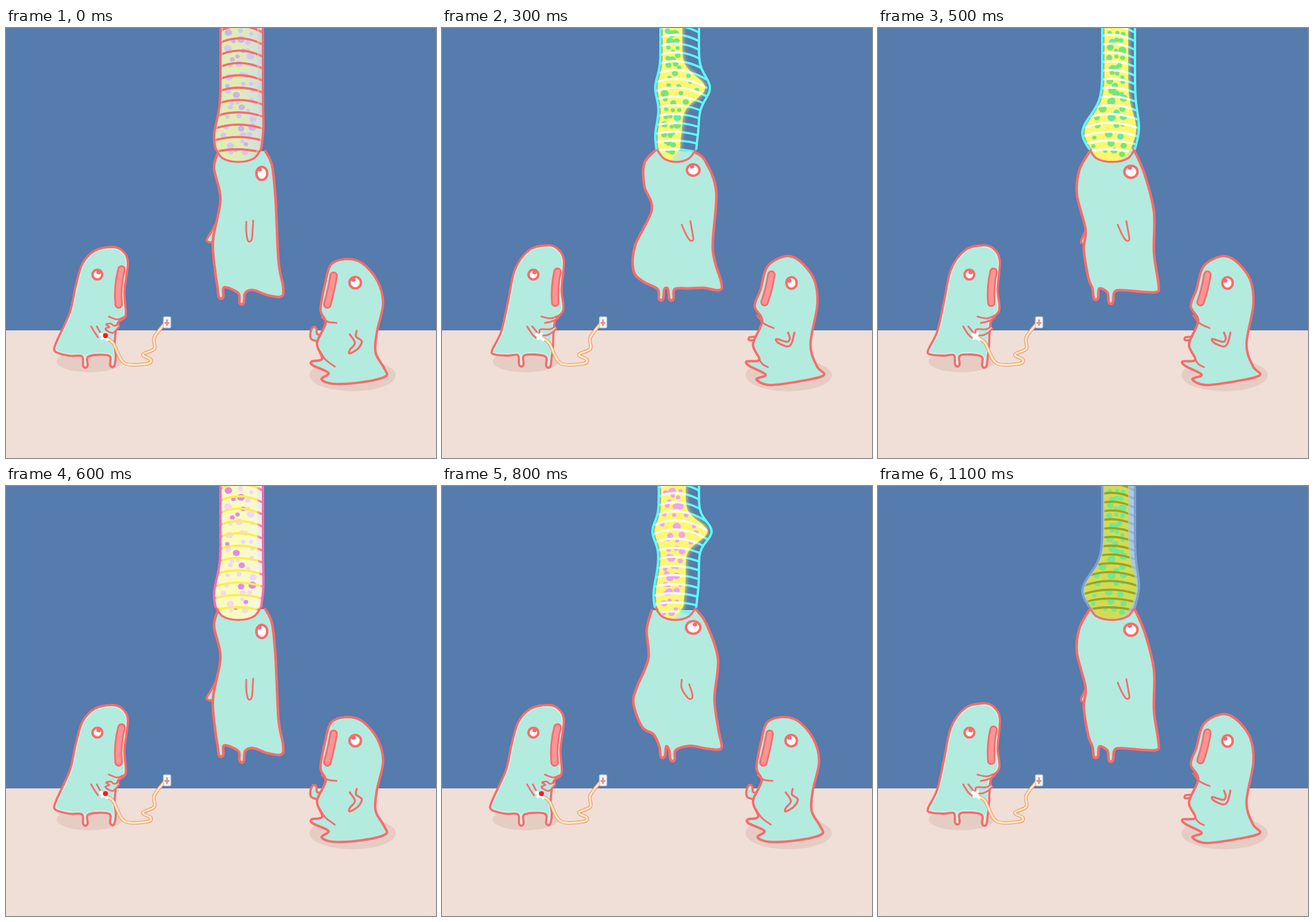
These frames come from a looping animation (748 px wide and 748 px high, 1.2 s). An HTML page with a canvas:

```html
<!DOCTYPE html>
<html>
<head>
<meta charset="utf-8">
<style>
html, body { margin: 0; width: 100%; height: 100%; overflow: hidden; background: #567bad; }
canvas { display: block; }
</style>
</head>
<body>
<canvas id="stage" width="748" height="748"></canvas>
<script>
const ctx = document.getElementById('stage').getContext('2d');
const BLUE = '#567bad', FLOOR = '#f0dfd7', SHADOW = '#e6cdc4';
const CORAL = '#f76c6c', MINT = '#b3ebdf', LIP = '#fb9595', CYAN = '#5cfbff';
ctx.lineCap = ctx.lineJoin = 'round';

// Smooth curve through points, given as "x,y x,y" or as pairs.
function curve(points, open) {
  const p = typeof points === 'string' ? points.split(' ').map(s => s.split(',').map(Number)) : points;
  const n = p.length, path = new Path2D();
  const at = i => p[open ? Math.max(0, Math.min(n - 1, i)) : (i + n) % n];
  path.moveTo(...p[0]);
  for (let i = 0; i < n - (open ? 1 : 0); i++) {
    const [a, b, c, d] = [at(i - 1), at(i), at(i + 1), at(i + 2)];
    path.bezierCurveTo(b[0] + (c[0] - a[0]) / 6, b[1] + (c[1] - a[1]) / 6,
      c[0] - (d[0] - b[0]) / 6, c[1] - (d[1] - b[1]) / 6, ...c);
  }
  if (!open) path.closePath();
  return path;
}
function stroke(path, color, width) {
  ctx.strokeStyle = color;
  ctx.lineWidth = width;
  ctx.stroke(path);
}
function fill(path, color) {
  ctx.fillStyle = color;
  ctx.fill(path);
}
const line = (s, width = 3) => stroke(curve(s, true), CORAL, width);
function limb(s, width = 3) {
  fill(curve(s, true), MINT);
  line(s, width);
}
function oval(x, y, rx, ry, color) {
  const path = new Path2D();
  path.ellipse(x, y, rx, ry, 0, 0, 7);
  fill(path, color);
  return path;
}
function eye(x, y, rx, ry, dx, dy) {
  stroke(oval(x, y, rx, ry, '#fff'), CORAL, 4.2);
  oval(x + dx, y + dy, 3.8, 3.5, CORAL);
}
function mouth(d) {
  const path = new Path2D(d);
  stroke(path, CORAL, 14.5);
  stroke(path, LIP, 8.5);
}

// A torso runs down the back, round two feet and up the front.
const foot = (x, y) => `${x - 6},${y - 20} ${x - 4},${y - 4} ${x},${y} ${x + 4},${y - 4} ${x + 6},${y - 20}`;
const torso = (back, feet, front) => [back, ...feet.map(f => foot(...f)), front].join(' ');

const left = [{
  body: torso('186,381 155,387 133,410 121,450 111,495 87,548 86,563 110,570', [[138, 591], [185, 590]],
    '189,548 194,514 208,500 206,458 212,408 203,388'),
  mouth: 'M201,420 Q193,450 196,481',
  lines: ['179,502 194,507 208,501', '148,519 154,529 160,538', '158,519 164,530'],
  hand: '197,515 188,518 182,514 174,516 180,520 173,523 178,528 187,530 197,519'
}, {
  body: torso('183,378 152,386 127,420 115,475 103,528 87,561 92,568 115,570', [[138, 589], [185, 591]],
    '193,555 196,512 211,490 208,455 212,405 201,384'),
  mouth: 'M201,424 Q195,450 197,478',
  lines: ['173,502 190,505 207,498', '179,513 192,510 203,504', '148,519 157,533 165,540', '157,519 170,535'],
  hand: '197,519 188,524 172,524 170,530 178,535 190,531 199,523'
}];

const right = [{
  body: '590,402 565,412 555,445 547,490 556,513 541,548 550,575 532,580 534,587 561,600 549,611 570,619 620,616 660,606 658,592 643,565 645,530 656,478 645,438 618,408',
  mouth: 'M570,431 Q566,455 559,481',
  lines: ['549,503 560,511 575,513', '546,562 556,577 572,589'],
  back: '547,546 531,541 530,528 535,520 540,523 541,532 549,534',
  arm: '610,527 609,537 619,545 612,558 598,566 598,560 607,548 598,533',
  eye: [607.5, 443, 10, 10, -3, -5]
}, {
  body: '597,397 566,415 554,455 544,484 557,510 541,550 552,577 530,580 535,588 563,603 547,611 570,621 625,614 664,604 652,588 641,550 653,480 647,437 622,405',
  mouth: 'M573,429 Q569,455 561,477',
  lines: ['548,500 560,514 577,522', '552,577 558,585 567,590'],
  back: '545,537 535,538 534,543 543,543',
  arm: '602,530 605,540 600,546 582,541 584,547 600,554 608,549 613,530',
  eye: [608, 443.5, 9, 10, -4, -4]
}];

const hang = {
  body: torso('368,218 362,245 373,298 360,370 364,425', [[374, 471], [410, 481]],
    '430,456 456,465 479,467 482,450 474,405 469,300 463,240 451,214'),
  eye: [445, 253, 9.5, 11.5, -4, -7],
  arm: '418,337 418,355 421,370 425,371 428,365 430,335',
  back: '365,340 357,355 349,369 357,373 363,368'
};
const lean = {
  body: torso('368,215 350,248 346,290 361,350 358,385 366,435', [[379, 473], [405, 480]],
    '422,456 460,459 485,459 488,446 480,390 480,320 464,255 444,209'),
  eye: [440, 250, 11.5, 10.5, -2, -7],
  arm: '417,342 424,358 431,369 437,369 436,358 432,336',
  back: '360,355 353,372 359,376'
};
const sag = {
  body: torso('365,216 356,250 359,300 339,350 333,378 348,419 368,432', [[384, 473], [401, 479]],
    '432,452 462,457 486,456 481,425 474,370 480,300 460,240 443,216'),
  eye: [437, 246, 12.5, 11, 3, -5],
  arm: '417,337 417,352 428,369 435,369 435,360 430,345'
};
const round = {
  body: torso('372,212 352,235 352,275 365,316 336,378 333,422 350,441', [[381, 474], [399, 474]],
    '430,453 455,452 482,456 486,443 471,385 477,285 457,230 438,215'),
  eye: [437, 247, 11, 10, -2, -6],
  arm: lean.arm
};
const bodies = [hang, lean, sag, round, sag, lean];

// A bulge slides down the tube: y is its height, out its reach to either side,
// gap the space that the filling leaves free on the right.
const tubes = [
  { y: 190, span: 40, base: 373, out: [2, 2], gap: 7, step: 21 },
  { y: 40, span: 22, base: 379, out: [9, 15], gap: 20, step: 18 },
  { y: 79, span: 24, base: 377, out: [11, 22], gap: 20, step: 15.5 },
  { y: 104, span: 28, base: 380, out: [9, 19], gap: 26, step: 15 },
  { y: 142, span: 30, base: 383, out: [13, 15], gap: 18, step: 15 },
  { y: 180, span: 42, base: 390, out: [26, 8], gap: 9, step: 15 }
];
const bell = (y, mid, span) => Math.exp(-(((y - mid) / span) ** 2));
const leftEdge = (t, y) => t.base - t.out[0] * bell(y, t.y, t.span) - 9 * bell(y, 190, 40);
const rightEdge = (t, y) => 447 + t.out[1] * bell(y, t.y, t.span) - 5 * bell(y, 220, 35);
const coreEdge = (t, y) => rightEdge(t, y) - 3 - t.gap * (1 - 0.8 * bell(y, t.y, t.span));

function side(tube, edge, inset = 0) {
  const points = [];
  for (let y = -10; y <= 210; y += 10) points.push([edge(tube, y) + inset, y]);
  return points;
}
function sleeve(a, b) {
  const [x1, y] = a[a.length - 1], x2 = b[b.length - 1][0];
  const cap = [[x1, y], [x1 + 13, y + 17], [(x1 + x2) / 2, y + 23], [x2 - 13, y + 17], [x2, y]];
  return { cap, shape: curve([...a, ...cap.slice(1, -1), ...b.slice().reverse()]) };
}

function random(seed) {
  return () => {
    seed = seed * 16807 % 2147483647;
    return seed / 2147483647;
  };
}

const green = { edge: CYAN, core: '#fbf86f', spots: ['#76e678', '#66e8a8'], ring: '#fffff0', behind: CYAN };
const pink = { ...green, spots: ['#f0a2f3', '#f0a2f3'] };
const pale = { edge: CORAL, back: '#c8d6e2', core: '#e0ecb6', tint: '#d2dfe0', spots: ['#d4c8ea', '#cbb5e6'], ring: CORAL, behind: CORAL };
const plain = { edge: CORAL, back: '#b4c3df', core: '#e9f569', spots: ['#9dcabb', '#5fd66c'], behind: CORAL };
const bright = { edge: '#fd6ea6', back: '#eceaf4', core: '#fbfbbd', tint: '#f6f7e2', spots: ['#f0d8f6', '#e58ae2'], ring: '#fdec52', behind: '#fd6ea6' };
const dull = { edge: '#7ba2d0', back: '#a9c8f1', core: '#d1dc55', spots: ['#74e88c', '#74e88c'], ring: '#98a428', behind: '#8eb1dc' };
const styles = [pale, plain, green, green, green, green, bright, pink, pink, pink, pink, dull];

function drawRings(tube, color) {
  for (let y = 3; y < 225; y += tube.step) {
    const bow = 19 - y / 18;
    stroke(new Path2D(`M360,${y + bow / 2} Q408,${y - bow * 1.3} 460,${y + bow / 2 + 4}`), color, 3.8);
  }
}

function drawSpots(tube, colors) {
  const rnd = random(tube.y * 97 + 5);
  for (let y = 7; y < 226; y += 15) {
    const x1 = leftEdge(tube, y) + 12, x2 = coreEdge(tube, y) - 8;
    for (let i = 0; i < 3; i++) {
      const x = x1 + (x2 - x1) * (i + rnd() * 0.8) / 2.8, r = 3.6 + 3.6 * rnd() ** 2;
      oval(x, y + 10 * rnd() - 5, r, r * 0.9, colors[rnd() < 0.25 ? 1 : 0]);
    }
  }
}

function drawTube(tube, style) {
  const a = side(tube, leftEdge), b = side(tube, rightEdge);
  const { cap, shape } = sleeve(a, b);
  const core = sleeve(side(tube, leftEdge, 4), side(tube, coreEdge)).shape;
  ctx.save();
  ctx.clip(shape);
  if (style.back) fill(shape, style.back);
  drawRings(tube, style.behind);
  const shade = ctx.createLinearGradient(375, 0, 445, 0);
  shade.addColorStop(0.4, style.core);
  shade.addColorStop(1, style.tint || style.core);
  ctx.shadowColor = style.core;
  ctx.shadowBlur = 8;
  fill(core, shade);
  ctx.shadowBlur = 0;
  drawSpots(tube, style.spots);
  if (style.ring) {
    ctx.clip(core);
    drawRings(tube, style.ring);
  }
  ctx.restore();
  line(cap, 3.5);
  for (const s of [a, b]) stroke(curve(s, true), style.edge, 4);
}

function drawLeft(pose, blink) {
  oval(145, 580, 57, 19, SHADOW);
  const body = curve(pose.body);
  fill(body, MINT);
  ctx.save();
  ctx.clip(body);
  stroke(body, '#c9f2ea', 8);
  ctx.restore();
  stroke(body, CORAL, 3.8);
  mouth(pose.mouth);
  if (blink) line('150,428 155,432 162,433 168,429', 3.5);
  else eye(159, 429, 8.5, 8.5, 2, -4);
  pose.lines.forEach(s => line(s));
  limb(pose.hand);
}

function drawCord(pressed) {
  const cord = curve('175,540 187,549 206,583 245,584 252,577 238,568 258,558 258,538 277,513', true);
  stroke(cord, '#f28a72', 6);
  stroke(cord, '#f9e7b8', 3.8);
  stroke(new Path2D('M165,533 L176,542 M173,532 L167,540'), '#fff', 5.5);
  if (pressed) oval(173, 535, 4.5, 4.5, '#fa1c1c');
  const socket = new Path2D();
  socket.roundRect(274, 502.5, 12.5, 19, 2);
  fill(socket, '#f6f8fa');
  stroke(socket, '#bfd3e0', 1.5);
  stroke(new Path2D('M280,508 V517 M277,513 H283'), '#e58a8a', 3);
}

function drawRight(pose) {
  oval(603, 604, 75, 28, SHADOW);
  limb(pose.back, 3.8);
  const body = curve(pose.body);
  fill(body, MINT);
  stroke(body, CORAL, 4.2);
  mouth(pose.mouth);
  pose.lines.forEach(s => line(s));
  line(pose.arm, 3.5);
  eye(...pose.eye);
}

function drawMiddle(pose) {
  if (pose.back) limb(pose.back, 3.8);
  limb(pose.body, 4.5);
  eye(...pose.eye);
  line(pose.arm);
}

let shown = -1;
function tick() {
  const step = Math.floor(performance.now() / 100) % 12;
  if (step !== shown) {
    shown = step;
    ctx.fillStyle = BLUE;
    ctx.fillRect(0, 0, 748, 748);
    ctx.fillStyle = FLOOR;
    ctx.fillRect(0, 526, 748, 222);
    drawLeft(left[step % 2], step === 1);
    drawCord(step % 2 === 0);
    drawRight(right[step % 2]);
    drawMiddle(bodies[step % 6]);
    drawTube(tubes[step % 6], styles[step]);
  }
  requestAnimationFrame(tick);
}
tick();
</script>
</body>
</html>
```
